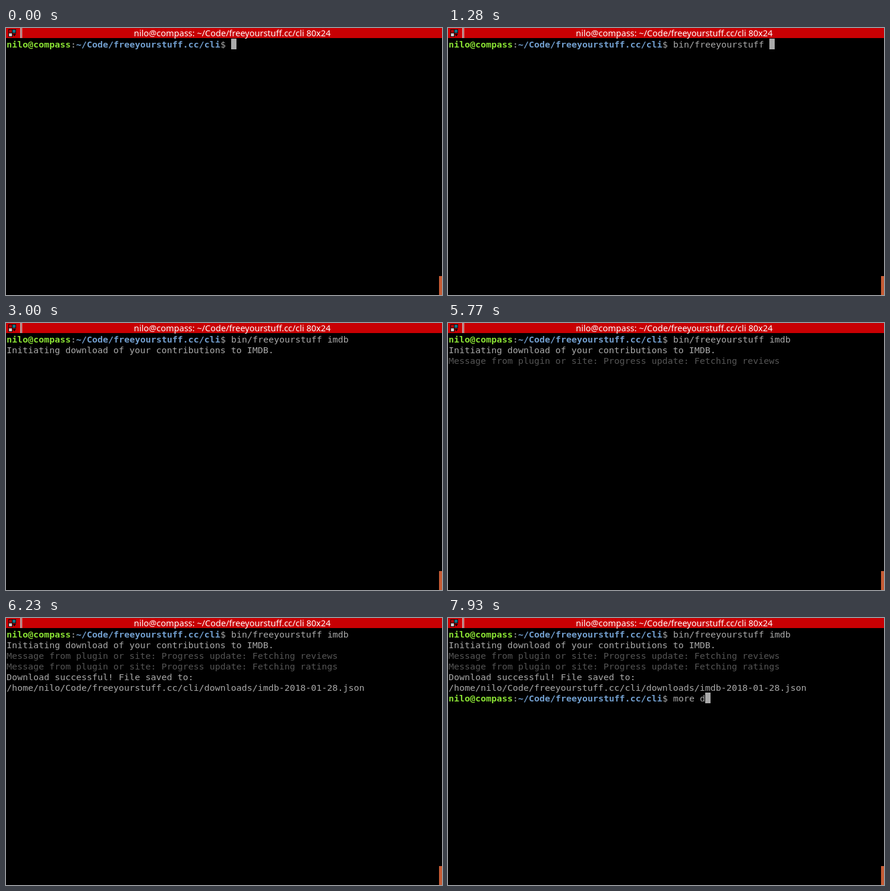
An HTML page with a canvas for the animation above (8000 ms loop, 734 by 451 pixels).

```html
<!DOCTYPE html>
<html lang="en">
<head>
<meta charset="utf-8">
<title>Terminal session</title>
<style>
html, body { margin: 0; width: 100%; height: 100%; overflow: hidden; background: #000; }
canvas { display: block; }
</style>
</head>
<body>
<canvas id="stage" width="734" height="451"></canvas>
<script>
const ctx = document.getElementById('stage').getContext('2d');

const LOOP = 8000;
const CELL_W = 9, ROW_H = 18, LEFT = 1, TOP = 18, BASELINE = 15;
const MONO = '14.95px "DejaVu Sans Mono", monospace';
const GREY = '#aaaaaa', DIM = '#555555', GREEN = '#8ae234', BLUE = '#729fcf';

const HOST = 'nilo@compass';
const PATH = '~/Code/freeyourstuff.cc/cli';
const PROMPT_LEN = HOST.length + PATH.length + 3;

// Each entry: [time in ms, text on the command line from then on, cursor shown]
const FIRST_COMMAND = [
  [0, '', true],
  [390, 'b', true], [500, 'bi', true], [600, 'bin', true],
  [850, 'bin/', true], [920, 'bin/f', true], [1000, 'bin/fr', true], [1070, 'bin/fre', true],
  [1280, 'bin/freeyourstuff ', true],
  [1710, 'bin/freeyourstuff i', true], [1810, 'bin/freeyourstuff im', true],
  [1900, 'bin/freeyourstuff imd', false], [2000, 'bin/freeyourstuff imdb', false]
];
const SECOND_COMMAND = [
  [6330, '', true],
  [7190, 'm', true],
  [7370, 'mo', true], [7480, 'mor', true], [7590, 'more', true], [7700, 'more ', true],
  [7930, 'more d', true]
];

// Each entry: [time in ms, row, text, colour]
const OUTPUT = [
  [3000, 1, 'Initiating download of your contributions to IMDB.', GREY],
  [5770, 2, 'Message from plugin or site: Progress update: Fetching reviews', DIM],
  [5810, 3, 'Message from plugin or site: Progress update: Fetching ratings', DIM],
  [6230, 4, 'Download successful! File saved to:', GREY],
  [6230, 5, '/home/nilo/Code/freeyourstuff.cc/cli/downloads/imdb-2018-01-28.json', GREY]
];

function box(x, y, w, h, color) {
  ctx.fillStyle = color;
  ctx.fillRect(x, y, w, h);
}

function write(text, col, row, color, bold = false) {
  ctx.font = (bold ? 'bold ' : '') + MONO;
  ctx.textAlign = 'left';
  ctx.fillStyle = color;
  ctx.fillText(text, LEFT + col * CELL_W, TOP + row * ROW_H + BASELINE);
}

function drawGroupButton() {
  box(4, 2, 13, 7, '#0c0808');
  box(4, 8, 7, 7, '#0c0808');
  box(5, 3, 5, 5, '#b00508');
  box(11, 3, 5, 5, '#167486');
  box(5, 9, 5, 5, '#d5cccc');
  ctx.fillStyle = '#0c0808';
  ctx.beginPath();
  ctx.moveTo(11, 10);
  ctx.lineTo(17, 10);
  ctx.lineTo(14, 14);
  ctx.fill();
}

function drawWindow() {
  box(0, 0, 734, 451, '#000000');
  box(0, 0, 734, 17, '#c80003');
  drawGroupButton();

  box(24, 0, 3, 17, '#ffffff');
  box(25, 0, 1, 17, '#5a0000');

  ctx.font = '14.5px "Noto Sans", sans-serif';
  ctx.textAlign = 'right';
  ctx.fillStyle = '#ffffff';
  ctx.fillText(`${HOST}: ${PATH} 80x24`, 546.5, 14);

  box(729, 419, 5, 32, '#c65b34');
}

function drawCommand(steps, row, t) {
  const step = steps.filter(([time]) => time <= t).pop();
  if (!step) return;
  const [, text, cursor] = step;
  write(HOST, 0, row, GREEN, true);
  write(':', HOST.length, row, GREY);
  write(PATH, HOST.length + 1, row, BLUE, true);
  write('$', PROMPT_LEN - 2, row, GREY);
  write(text, PROMPT_LEN, row, GREY);
  if (cursor) {
    box(LEFT + (PROMPT_LEN + text.length) * CELL_W, TOP + row * ROW_H, CELL_W, ROW_H, GREY);
  }
}

function render(now) {
  const t = now % LOOP;
  drawWindow();
  drawCommand(FIRST_COMMAND, 0, t);
  for (const [time, row, text, color] of OUTPUT) {
    if (t >= time) write(text, 0, row, color);
  }
  drawCommand(SECOND_COMMAND, 6, t);
  requestAnimationFrame(render);
}
requestAnimationFrame(render);
</script>
</body>
</html>
```
